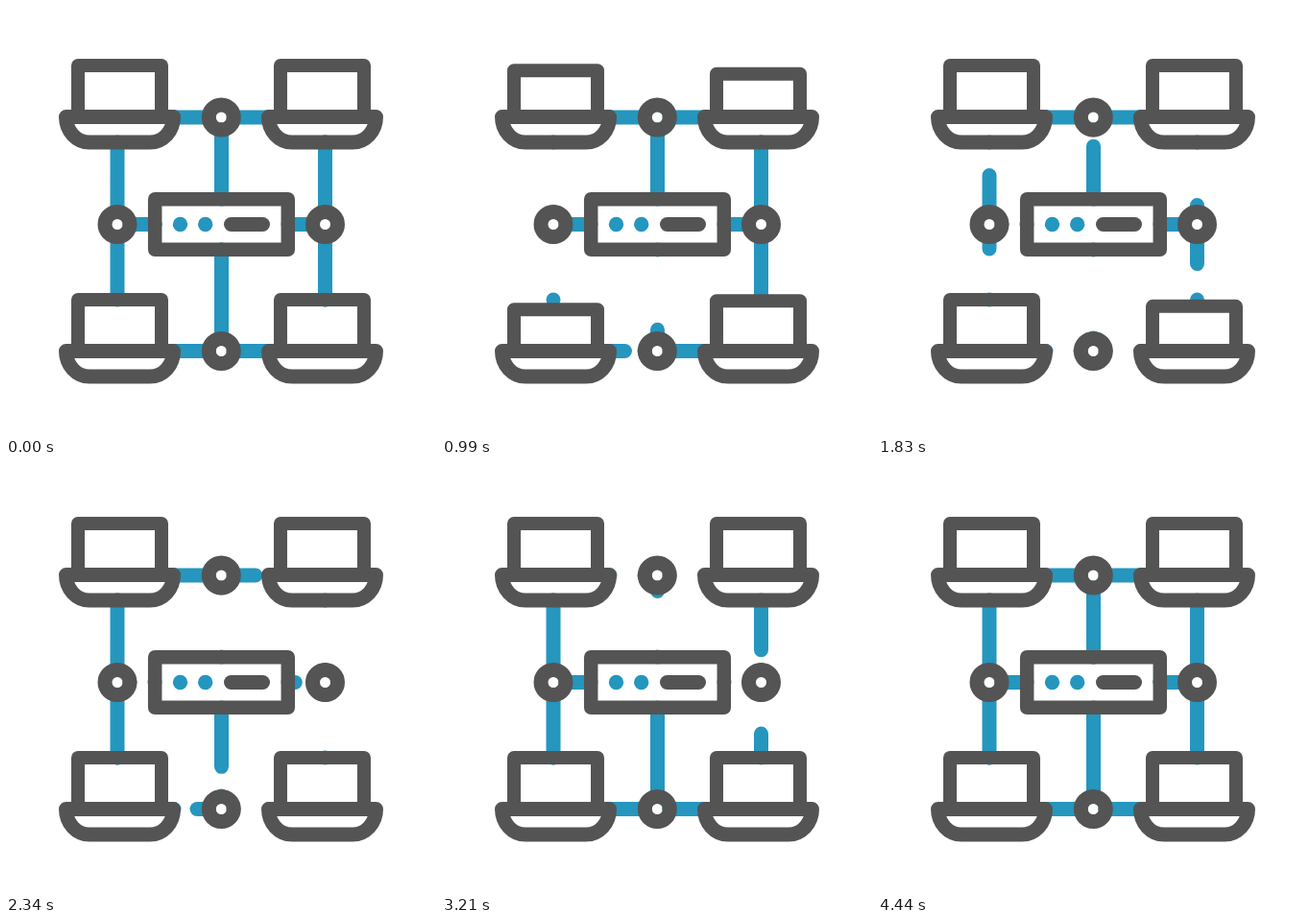
An HTML page with a canvas for the animation above (4500 ms loop, 448 by 448 pixels).

```html
<!DOCTYPE html>
<html lang="en">
<head>
<meta charset="utf-8">
<title>Network</title>
<style>
  html, body { margin: 0; width: 100%; height: 100%; overflow: hidden; background: #fff; }
  canvas { display: block; width: 448px; height: 448px; }
</style>
</head>
<body>
<canvas id="stage" width="448" height="448"></canvas>
<script>
const ctx = document.getElementById('stage').getContext('2d');
const GRAY = '#545454', BLUE = '#2596be';
const LOOP = 4500, TICK = 30;
const STAGGER = 210, DRAW = 630, REGROW = 1500;
const DIP = 12;

// Links in the order they travel: x1, y1 -> x2, y2
const links = [
  [116, 214.5, 116, 142],
  [116, 240.5, 116, 306],
  [224.5, 254, 224.5, 346],
  [211, 359.5, 175, 359.5],
  [155, 227.5, 129, 227.5],
  [274, 359.5, 237, 359.5],
  [332.5, 142, 332.5, 214.5],
  [332.5, 306, 332.5, 240.5],
  [224.5, 129, 224.5, 201],
  [319.5, 227.5, 294, 227.5],
  [274, 116, 237, 116],
  [175, 116, 211, 116]
];

// Offset x, y and the time its screen starts to dip
const laptops = [[0, 0, 0], [0, 244, 265], [211, 0, 530], [211, 244, 930]];
const nodes = [[224.3, 116], [116, 227.5], [332.5, 227.5], [224.3, 359.5]];

const clamp = v => Math.min(1, Math.max(0, v));

function stroke(color, width, path) {
  ctx.strokeStyle = color;
  ctx.lineWidth = width;
  ctx.beginPath();
  path();
  ctx.stroke();
}

function line(x1, y1, x2, y2, color) {
  stroke(color, 15, () => {
    ctx.moveTo(x1, y1);
    ctx.lineTo(x2 + 0.01, y2);
  });
}

function drawLink([x1, y1, x2, y2], i, t) {
  const at = p => [x1 + (x2 - x1) * p, y1 + (y2 - y1) * p];
  const tail = clamp((t - i * STAGGER) / DRAW);
  const head = clamp((t - REGROW - i * STAGGER) / DRAW);
  line(...at(tail), x2, y2, BLUE);
  line(x1, y1, ...at(head), BLUE);
}

function drawLaptop([x, y, start], t) {
  const dip = DIP * clamp(1 - Math.abs((t - start) / DRAW - 1));
  ctx.save();
  ctx.translate(x, y);
  stroke(GRAY, 14, () => {
    ctx.moveTo(75, 115.5);
    ctx.lineTo(75, 62 + dip);
    ctx.lineTo(162, 62 + dip);
    ctx.lineTo(162, 115.5);
  });
  stroke(GRAY, 15, () => {
    ctx.moveTo(62.5, 115.5);
    ctx.lineTo(174.5, 115.5);
    ctx.bezierCurveTo(174.5, 130, 164, 142, 150, 142);
    ctx.lineTo(87, 142);
    ctx.bezierCurveTo(73, 142, 62.5, 130, 62.5, 115.5);
    ctx.closePath();
  });
  ctx.restore();
}

function drawServer() {
  stroke(GRAY, 14.5, () => ctx.rect(155.2, 201.2, 138.6, 52.6));
  line(234.5, 227.5, 267.5, 227.5, GRAY);
  ctx.fillStyle = BLUE;
  for (const x of [181.5, 207.7]) {
    ctx.beginPath();
    ctx.arc(x, 227.5, 7.7, 0, Math.PI * 2);
    ctx.fill();
  }
}

function draw(t) {
  ctx.fillStyle = '#fff';
  ctx.fillRect(0, 0, 448, 448);
  ctx.lineCap = ctx.lineJoin = 'round';
  links.forEach((link, i) => drawLink(link, i, t));
  laptops.forEach(laptop => drawLaptop(laptop, t));
  for (const [x, y] of nodes) {
    stroke(GRAY, 15, () => ctx.arc(x, y, 13, 0, Math.PI * 2));
  }
  drawServer();
}

const begin = performance.now();
function frame() {
  const t = (performance.now() - begin) % LOOP;
  draw(Math.floor(t / TICK) * TICK);
  requestAnimationFrame(frame);
}
frame();
</script>
</body>
</html>
```
